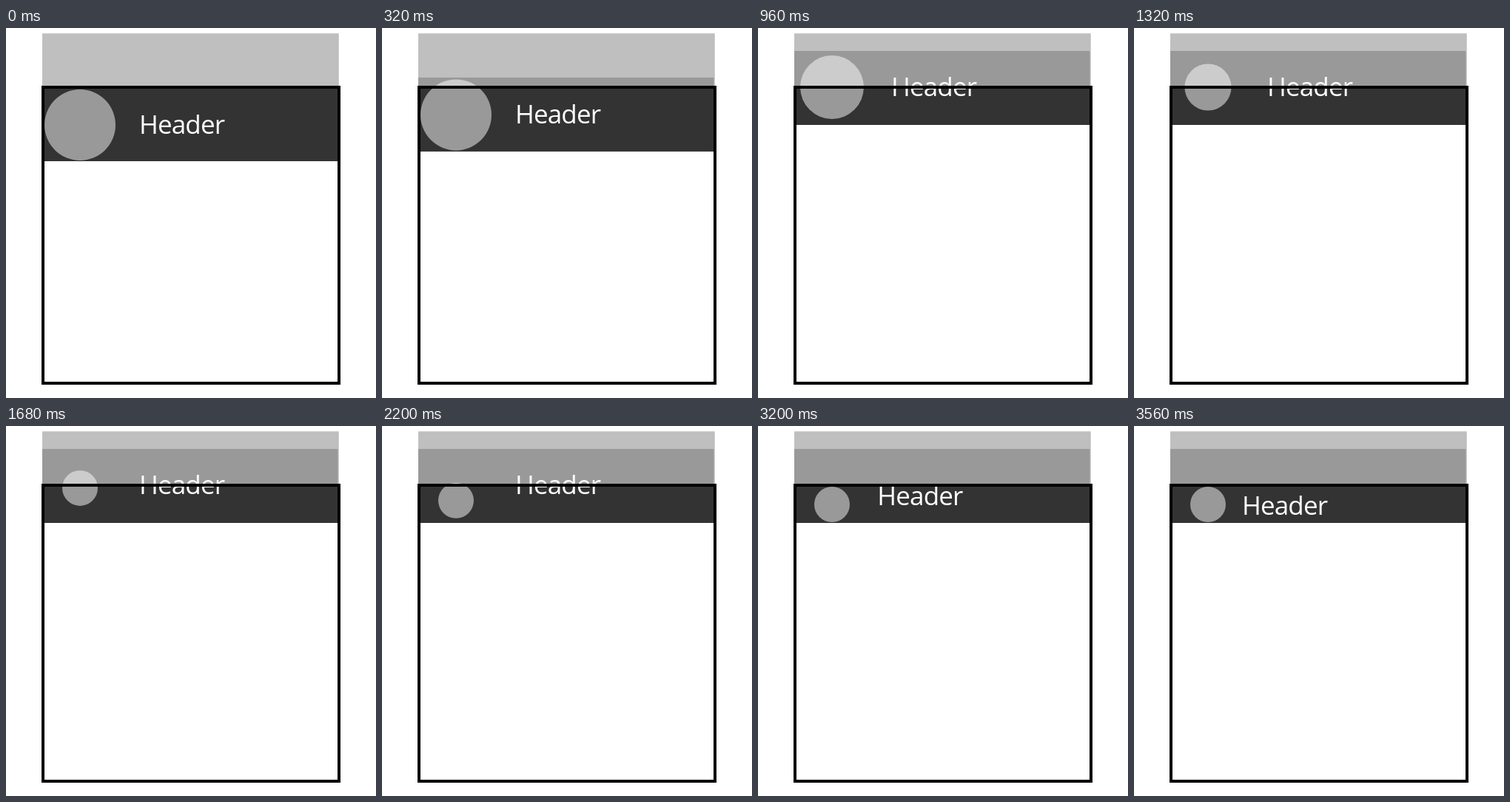
Animation of 500x500 px, one loop 4000 ms. Source, as an HTML page:

```html
<!DOCTYPE html>
<html lang="en">
<head>
<meta charset="utf-8">
<title>Collapsing header</title>
<style>
  html, body { margin: 0; width: 100%; height: 100%; overflow: hidden; background: #fff; }
  svg { display: block; width: 100%; height: 100%; }
  text { font: 35px "Open Sans", "Noto Sans", sans-serif; letter-spacing: -.85px; fill: #fff; }
</style>
</head>
<body>
<svg viewBox="0 0 500 500">
  <rect x="49" y="7.5" width="400.5" height="72.5" fill="#7f7f7f"/>
  <rect id="bar" x="49" y="80" width="399.5" height="100" fill="#333"/>
  <circle id="avatar" cx="100" cy="131" r="48" fill="#999"/>
  <text id="title" x="180" y="142.5">Header</text>
  <!-- veil over everything that has scrolled out of the viewport -->
  <rect x="49" y="7.5" width="400.5" height="71.5" fill="#fff" fill-opacity=".5"/>
  <rect x="50" y="80" width="400" height="400" fill="none" stroke="#000" stroke-width="4"/>
</svg>
<script>
  const LOOP = 4000, STEP = 40;
  const [bar, avatar, title] = ['bar', 'avatar', 'title'].map(id => document.getElementById(id));

  const set = (node, attrs) => {
    for (const name in attrs) node.setAttribute(name, attrs[name]);
  };
  const progress = (t, start, end) => Math.min(1, Math.max(0, (t - start) / (end - start)));

  function draw(time) {
    const t = Math.floor((time % LOOP) / STEP) * STEP;
    const scroll = progress(t, 160, 760);
    const shrink = progress(t, 800, 1560);
    const drop = progress(t, 1560, 2360);
    const settle = progress(t, 2760, 3560);

    set(bar, { y: 80 - 49 * scroll });
    set(avatar, { cy: 131 - 51 * scroll + 26 * drop, r: 48 - 24 * shrink });
    set(title, { x: 180 - 34 * settle, y: 142.5 - 50.5 * scroll + 28 * settle });
  }

  const origin = performance.now();
  function tick() {
    draw(performance.now() - origin);
    requestAnimationFrame(tick);
  }
  tick();
</script>
</body>
</html>
```
